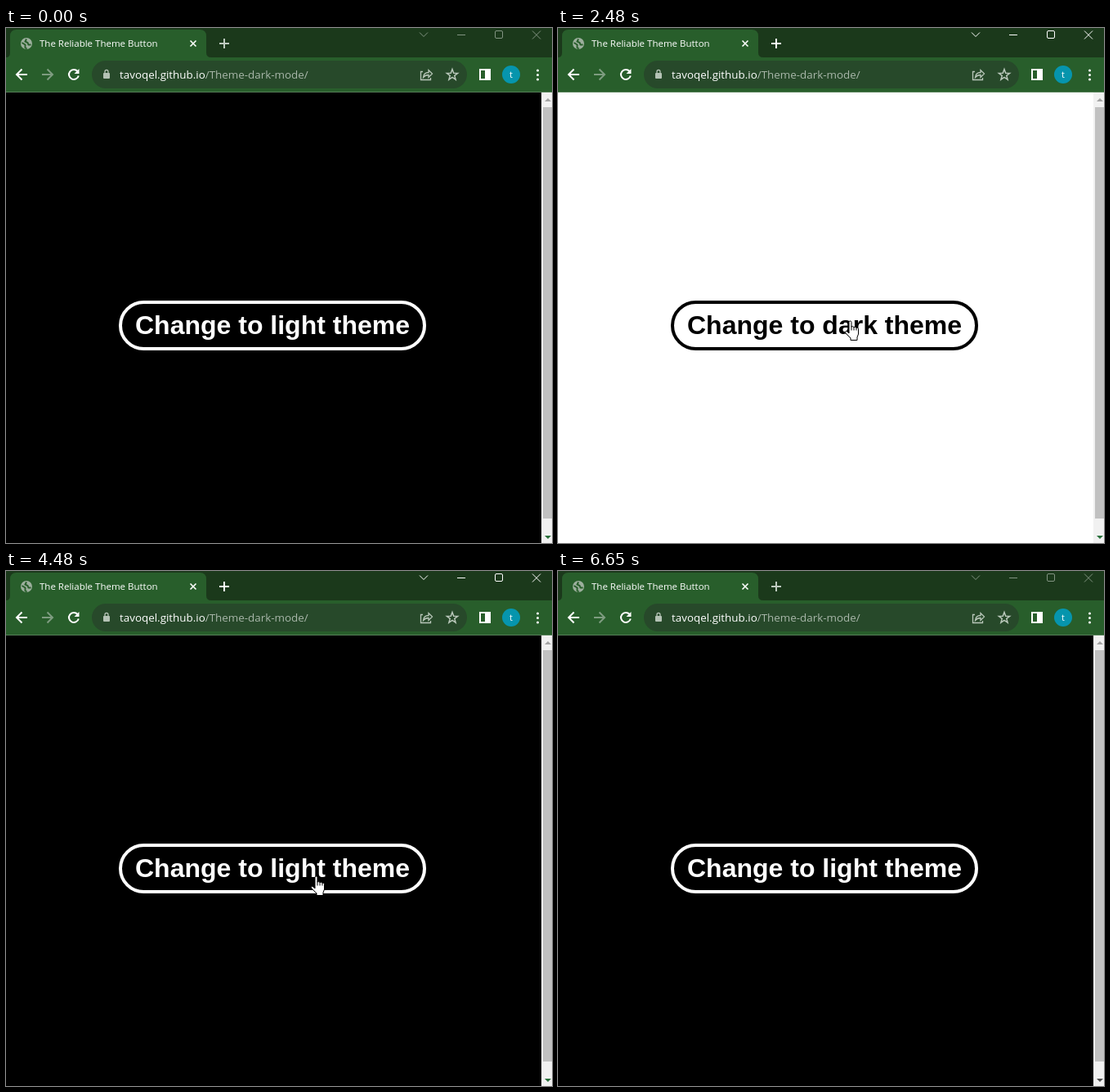
Animation of 668 by 631 pixels, one loop 6720 ms. Source, as an HTML page:

```html
<!DOCTYPE html>
<html lang="en">
<head>
<meta charset="utf-8">
<title>Theme toggle</title>
<style>
  html, body { margin: 0; width: 100%; height: 100%; overflow: hidden; background: #000; }
  svg { display: block; width: 668px; height: 631px; }
  .ui { font-family: "Open Sans", "Noto Sans", sans-serif; }
  .line { fill: none; stroke-width: 2; }
  #label { font: bold 32px "Liberation Sans", Arial, sans-serif; }
</style>
</head>
<body>
<svg viewBox="0 0 668 631">
  <!-- page -->
  <rect id="page" y="79" width="656" height="552"/>
  <rect id="pill" x="140" y="336" width="372" height="57" rx="28.5" fill="none" stroke-width="4"/>
  <text id="label" x="158" y="375"></text>

  <!-- scrollbar -->
  <rect x="655" y="79" width="13" height="552" fill="#f1f1f1"/>
  <rect x="657" y="97" width="11" height="504" fill="#c1c1c1"/>
  <path d="M659 90l4-4 4 4z" fill="#a3a3a3"/>
  <path id="scrollDown" d="M659 622h8l-4 4z"/>

  <!-- tab strip -->
  <rect width="668" height="37" fill="#1b391b"/>
  <path d="M0 36q5 0 5-6V10q0-8 8-8h224q8 0 8 8v20q0 6 6 6z" fill="#285e2b"/>
  <circle cx="25" cy="19" r="7" fill="#9caf9d"/>
  <path d="M19.5 18l4 2.500v3.500l2 1.500M25 13.500l-1.500 3 3 1.500 1 2.500h3" class="line" stroke="#285e2b"/>
  <text class="ui" x="41" y="23" font-size="11.5" fill="#fff">The Reliable Theme Button</text>
  <path d="M225.500 15.500l7 7m0-7l-7 7" class="line" stroke="#fff" style="stroke-width:1.6"/>
  <path id="plus" d="M261 19h12M267 13v12" class="line"/>
  <g id="controls" class="line" style="stroke-width:1">
    <path d="M506 5.500l5 5 5-5M552 8.500h10M644 3.500l10 10m0-10l-10 10"/>
    <rect x="598.500" y="3.500" width="9" height="9" rx="1.500"/>
  </g>

  <!-- toolbar -->
  <rect y="36" width="668" height="43" fill="#285e2b"/>
  <rect y="78" width="668" height="1" fill="#557f57"/>
  <rect x="105" y="40" width="459" height="34" rx="17" fill="#27492a"/>
  <g class="line" stroke="#fff">
    <path d="M26 57H13M19.500 50.500L13 57l6.500 6.500"/>
    <path d="M44 57h13M50.500 50.500L57 57l-6.500 6.500" stroke="#7e9c80"/>
    <path d="M87.500 53a6 6 0 1 0 1.300 5.500"/>
    <path d="M89.500 50v6h-6z" fill="#fff" stroke="none"/>
    <rect x="580" y="51" width="12" height="12"/>
    <path d="M587 51h5v12h-5z" fill="#fff"/>
  </g>
  <rect x="119" y="55" width="8" height="7" rx="1" fill="#b4c2b5"/>
  <path d="M121 55v-1.500a2 2 0 0 1 4 0V55" class="line" stroke="#b4c2b5" style="stroke-width:1.3"/>
  <text class="ui" x="139" y="62" font-size="13.4" fill="#fff">tavoqel.github.io<tspan fill="#a9b7aa">/Theme-dark-mode/</tspan></text>
  <g class="line" stroke="#b9c7ba" style="stroke-width:1.3">
    <path d="M510 53.500h-2.500v10h12V61M510.500 60.500q.5-6 6.500-6v-3l4.500 4.500-4.500 4.500v-3q-4 0-6.500 3z"/>
    <path id="star" stroke-width="1.500"/>
  </g>
  <circle cx="618" cy="57" r="11" fill="#0695ad"/>
  <text class="ui" x="618" y="61" font-size="11" text-anchor="middle" fill="#fff">t</text>
  <path d="M650.500 52v0m0 5.500v0m0 5.500v0" stroke="#fff" stroke-width="3" stroke-linecap="round"/>

  <!-- pointer -->
  <circle id="click" cx="356" cy="359" r="12" fill="#ff0" fill-opacity=".5"/>
  <g id="pointer" fill="#fff" stroke="#000">
    <path id="arrow" d="M.5.5V17.500l4-3.800 2.700 5.800 2.600-1.200-2.700-5.700H12.300z"/>
    <g id="hand" transform="translate(1.500 0)">
      <path d="M-1.500 15V1.500a1.500 1.500 0 0 1 3 0V7q1.500-1 3 .5 1.700-.7 3 .6 2-.5 2.500 1.500V16l-1.500 4v3.500H.5V21L-5.500 15q-1.500-2 .5-2.500 1.500 0 3.500 2.500z"/>
      <path d="M1.500 6.500v5M4.500 7.500v4M7.500 8v3.500" fill="none"/>
    </g>
  </g>
</svg>
<script>
const LOOP = 6720;
const el = id => document.getElementById(id);
const show = (id, on) => el(id).style.display = on ? "" : "none";
const within = (v, a, b) => v >= a && v < b;
const mix = (a, b, k) => `rgb(${a.map((v, i) => Math.round(v + (b[i] - v) * k))})`;

// Pointer waypoints: time, x, y
const path = [
  [700, 632, 600], [1340, 425, 296], [1800, 356, 359], [4414, 356, 359],
  [4876, 512, 461], [5140, 601, 575], [5400, 604, 631]
];
// Stepped moves: first step, last step, number of steps
const moves = [[700, 1340, 11], [1400, 1800, 7], [4480, 5140, 11], [5210, 5400, 4]];

function stepTime(t) {
  const [start, end, count] = moves.filter(m => m[0] <= t).pop();
  const step = (end - start) / (count - 1);
  return Math.min(end, start + Math.floor((t - start) / step + 0.01) * step);
}

function pointerAt(t) {
  const s = stepTime(t);
  const i = Math.max(1, path.findIndex(p => p[0] >= s));
  const [t0, x0, y0] = path[i - 1], [t1, x1, y1] = path[i];
  const k = (s - t0) / (t1 - t0);
  return [Math.round(x0 + (x1 - x0) * k), Math.round(y0 + (y1 - y0) * k)];
}

function draw(t) {
  const light = within(t, 2480, 3850);
  const ink = light ? "#000" : "#fff";
  el("page").setAttribute("fill", light ? "#fff" : "#000");
  el("pill").setAttribute("stroke", ink);
  el("label").setAttribute("fill", ink);
  el("label").textContent = `Change to ${light ? "dark" : "light"} theme`;

  // The window gains focus on the first click and loses it near the end.
  const blur = t < 2230 ? 1 : t < 6530 ? 0 : Math.min(1, (Math.floor((t - 6530) / 60) + 1) / 3);
  el("controls").setAttribute("stroke", mix([255, 255, 255], [130, 148, 130], blur));
  el("plus").setAttribute("stroke", mix([255, 255, 255], [190, 202, 191], blur));
  el("scrollDown").setAttribute("fill", t < 6530 ? "#28703a" : "#505050");

  show("click", within(t, 2230, 2480) || within(t, 3600, 3850));
  const visible = within(t, 700, 5400);
  show("pointer", visible);
  if (!visible) return;
  const [x, y] = pointerAt(t);
  const over = within(x, 138, 514) && within(y, 334, 395);
  show("hand", over);
  show("arrow", !over);
  el("pointer").setAttribute("transform", `translate(${x} ${y})`);
}

const starPoints = Array.from({ length: 10 }, (_, i) => {
  const r = i % 2 ? 2.9 : 7, a = i * Math.PI / 5;
  return `${546 + r * Math.sin(a)} ${57.5 - r * Math.cos(a)}`;
});
el("star").setAttribute("d", `M${starPoints.join("L")}z`);

const begin = performance.now();
function tick() {
  draw((performance.now() - begin) % LOOP);
  requestAnimationFrame(tick);
}
tick();
</script>
</body>
</html>
```
